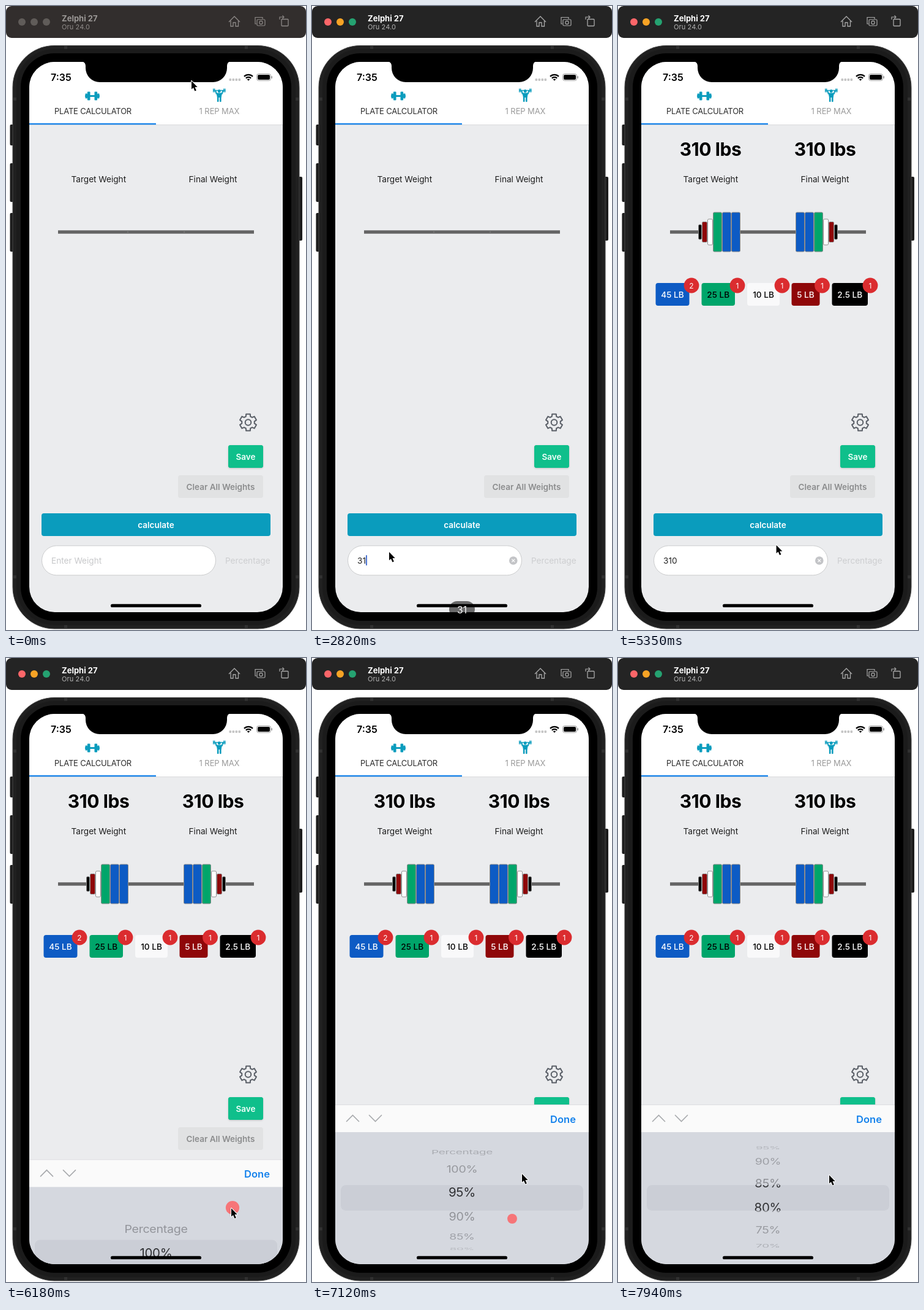
An HTML page with a canvas for the animation above (8 s loop, 490x1016 px).

```html
<!DOCTYPE html>
<html lang="en">
<head>
<meta charset="utf-8">
<title>Plate calculator</title>
<style>
html, body { margin: 0; width: 100%; height: 100%; overflow: hidden; background: #fff; }
canvas { display: block; width: 490px; height: 1016px; }
</style>
</head>
<body>
<canvas id="stage"></canvas>
<script>
const W = 490, H = 1016, LOOP = 8000;
const canvas = document.getElementById('stage');
const c = canvas.getContext('2d');
const dpr = window.devicePixelRatio || 1;
canvas.width = W * dpr;
canvas.height = H * dpr;

const TEAL = '#0a9cbd', BLUE = '#0d5bc4', GREEN = '#00a56a', RED = '#8f0709';
const clamp = v => Math.max(0, Math.min(1, v));
const ramp = (t, a, b) => clamp((t - a) / (b - a));
const smooth = u => u * u * (3 - 2 * u);

function box(x, y, w, h, r, fill, stroke, lw = 1) {
  c.beginPath();
  c.roundRect(x, y, w, h, r);
  if (fill) { c.fillStyle = fill; c.fill(); }
  if (stroke) { c.strokeStyle = stroke; c.lineWidth = lw; c.stroke(); }
}
function disc(x, y, r, fill) {
  c.beginPath();
  c.arc(x, y, r, 0, Math.PI * 2);
  c.fillStyle = fill;
  c.fill();
}
function line(pts, color, lw, close) {
  c.beginPath();
  pts.forEach(([x, y], i) => i ? c.lineTo(x, y) : c.moveTo(x, y));
  if (close) c.closePath();
  c.strokeStyle = color;
  c.lineWidth = lw;
  c.stroke();
}
// y is the middle of the capital letters
function text(s, x, y, size, color, { weight = 400, align = 'center', gap = 0 } = {}) {
  c.font = `${weight} ${size}px Inter, "Liberation Sans", sans-serif`;
  c.letterSpacing = gap + 'px';
  c.textAlign = align;
  c.fillStyle = color;
  c.fillText(s, x, y + size * 0.36);
}

// ---- timing ----
// start, end, x, y, sideways bow in y, easing
const easeOut = u => 1 - Math.pow(1 - u, 1.3);
const MOVES = [
  [100, 180, 296, 118, 0, smooth],
  [330, 1060, 126, 889, 0, smooth],
  [3800, 4260, 173, 851, 0, smooth],
  [5150, 5710, 368, 896, 7, easeOut],
  [6400, 6690, 327, 913, 0, smooth],
  [6780, 7110, 343, 840, 0, smooth],
  [7130, 7530, 349, 838, 0, smooth],
  [7560, 7940, 345, 842, 0, smooth]
];
function pointer(t) {
  let x = 303, y = 122;
  for (const [a, b, nx, ny, bow, ease] of MOVES) {
    const u = ease(ramp(t, a, b));
    x += (nx - x) * u;
    y += (ny - y) * u + bow * 4 * u * (1 - u);
  }
  return [x, y];
}
// press, release, x, y
const TAPS = [
  [1180, 1350, 127, 890],
  [4380, 4490, 173.5, 851.5],
  [5880, 6010, 370, 895],
  [6750, 6841, 327, 913]
];
const KEYS = [[3240, '310'], [2820, '31'], [2180, '3'], [0, '']];
const typed = t => KEYS.find(k => t >= k[0])[1];

function caretAlpha(t) {
  if (t < 1350 || t > 4490) return 0;
  return t < 2180 ? 1 - ramp(t, 1850, 2000) : 1;
}
function pickerDrop(t) {
  const s = (t - 6037) * 0.0156;
  return s <= 0 ? 260 : 260 * (1 + s) * Math.exp(-s);
}
const wheelPos = t => t < 6900 ? 1 : 1 + 4.805 * (1 - Math.exp((6900 - t) / 750));

// ---- window bar ----
function titleBar(on) {
  box(0, 0, W, 52, 9, on ? '#242424' : '#322e2d');
  const dots = on ? ['#fb6669', '#f6a325', '#25a271'] : ['#605c59', '#605c59', '#605c59'];
  dots.forEach((d, i) => disc(26 + 20 * i, 26, 6, d));
  text('Zelphi 27', 91, 20, 13, on ? '#fff' : '#9b9896', { weight: 700, align: 'left' });
  text('Oru 24.0', 91, 34.5, 11, on ? '#b4b4b4' : '#908c8a', { align: 'left', gap: 0.1 });
  const ink = on ? '#a9a9a9' : '#8d8987';
  line([[364, 26], [373, 17], [382, 26]], ink, 1.3);
  line([[367, 24], [367, 33], [371, 33], [371, 27], [375, 27], [375, 33], [379.5, 33], [379.5, 24]], ink, 1.3);
  line([[409, 29], [407, 29], [407, 18.5], [419, 18.5], [419, 21]], ink, 1.2);
  box(410, 22, 13, 10, 1.5, null, ink, 1.2);
  c.beginPath();
  c.arc(416.5, 27, 2.6, 0, 7);
  c.stroke();
  box(450, 21.5, 11, 11, 1, null, ink, 1.3);
  line([[447, 22], [447, 18], [454, 18]], ink, 1.2);
  line([[451.5, 15.5], [454, 18], [451.5, 20.5]], ink, 1.2);
}

// ---- phone body ----
function phone() {
  [[193, 34], [256, 63], [337, 63]].forEach(([y, h]) => box(6.5, y, 8, h, 2, '#1c1c1c'));
  box(476, 278, 8, 104, 2, '#1c1c1c');
  box(11, 64.5, 468, 949.5, 68, '#202020', '#444', 1);
  c.fillStyle = '#303030';
  for (const x of [95, 390]) { c.fillRect(x, 65, 5, 6); c.fillRect(x, 1008, 5, 6); }
  for (const y of [149, 927]) { c.fillRect(11.5, y, 6, 5); c.fillRect(473, y, 6, 5); }
  box(17, 70, 456, 938, 62, '#1b1b1b');
  box(24, 77, 442, 924, 55, '#000');
}

function notch() {
  c.fillStyle = '#000';
  c.beginPath();
  c.moveTo(123, 90);
  c.lineTo(367, 90);
  c.quadraticCurveTo(361, 91, 361, 98);
  c.arcTo(361, 124, 340, 124, 23);
  c.lineTo(153, 124);
  c.arcTo(130, 124, 130, 98, 23);
  c.lineTo(130, 98);
  c.quadraticCurveTo(130, 91, 123, 90);
  c.fill();
}

function statusBar() {
  text('7:35', 73, 116, 16, '#000', { weight: 600, align: 'left' });
  for (let i = 0; i < 4; i++) box(364.5 + i * 5, 118, 3.6, 4, 1.2, '#c6c6c6');
  c.strokeStyle = '#000';
  c.lineCap = 'butt';
  for (const [r, lw] of [[1.6, 3.2], [5.9, 2.2], [9.9, 2.3]]) {
    c.beginPath();
    c.arc(396, 121.8, r, -Math.PI * 0.75, -Math.PI * 0.25);
    c.lineWidth = lw;
    c.stroke();
  }
  box(409.5, 110.5, 23, 11, 3.2, null, '#999', 1);
  box(411, 112, 20, 8, 2, '#000');
  box(433.5, 114, 1.5, 4, 0.8, '#999');
}

function tabs() {
  c.fillStyle = '#fff';
  c.fillRect(38, 91, 414, 102);
  c.fillStyle = '#d9dadc';
  c.fillRect(38, 193, 414, 1);
  c.fillStyle = '#1d86ea';
  c.fillRect(38, 190.8, 207, 2.4);
  text('PLATE CALCULATOR', 142, 171, 13, '#2c2c2c', { gap: -0.2 });
  text('1 REP MAX', 348.5, 171, 13, '#9a9a9a', { gap: -0.1 });
  for (const s of [-1, 1]) {
    box(141 + s * 5.8 - 2.3, 139.5, 4.6, 14, 1, TEAL);
    box(141 + s * 9.8 - 1.7, 142.5, 3.4, 8, 1, TEAL);
  }
  c.fillRect(129, 145.4, 24, 2.4);
  c.fillRect(136, 145.2, 10, 2.8);
  // lifter
  c.fillRect(338, 136.8, 20.5, 1.3);
  for (const x of [338, 340, 355, 357]) c.fillRect(x, 134.5, 1.4, 6);
  disc(348.2, 138.6, 2.5, TEAL);
  c.lineCap = 'round';
  line([[342.5, 138], [343.5, 142.5], [353, 142.5], [354, 138]], TEAL, 2);
  c.beginPath();
  c.moveTo(343.5, 142); c.lineTo(353, 142); c.lineTo(351.5, 149); c.lineTo(345, 149);
  c.fill();
  for (const x of [346.2, 350.3]) line([[x, 148], [x, 155]], TEAL, 2.6);
}

function gear(x, y) {
  const pts = [];
  for (let i = 0; i < 6; i++) {
    const a = i * Math.PI / 3 - Math.PI / 2;
    for (const [d, r] of [[-0.36, 10.4], [-0.24, 14], [0.24, 14], [0.36, 10.4]])
      pts.push([x + r * Math.cos(a + d), y + r * Math.sin(a + d)]);
  }
  c.lineJoin = 'round';
  line(pts, '#5a5f67', 2, true);
  c.beginPath();
  c.arc(x, y, 4.8, 0, 7);
  c.stroke();
  c.lineJoin = 'miter';
}

// ---- results ----
const PLATES = [
  [131.5, 5, 24, '#000'], [137.5, 8, 33, RED], [146.5, 8, 42, '#fff'],
  [155.5, 14, 64, GREEN], [170.5, 14, 64, BLUE], [185.5, 14, 64, BLUE]
];
const CHIPS = [
  ['45 LB', 61.5, 55, BLUE, '#fff', 120, 2],
  ['25 LB', 136.5, 54.5, GREEN, '#000', 195, 1],
  ['10 LB', 211, 53, '#f9f9fa', '#000', 268, 1],
  ['5 LB', 283.5, 46, RED, '#fff', 333.5, 1],
  ['2.5 LB', 349.5, 58.5, '#000', '#fff', 412, 1]
];
function results() {
  for (const x of [151, 338])
    text('310 lbs', x, 233.5, 30, '#000', { weight: 700, gap: -0.4 });
  for (const [x, w, h, col] of PLATES) {
    box(x, 368 - h / 2, w, h, 1.8, col, '#8c8c8c');
    box(W - x - w, 368 - h / 2, w, h, 1.8, col, '#8c8c8c');
  }
  for (const [s, x, w, bg, ink, bx, n] of CHIPS) {
    box(x, 451, w, 37, 4, bg);
    text(s, x + w / 2, 470, 13.6, ink, { weight: 500 });
    disc(bx, 455, 12.4, '#db2c2f');
    text(String(n), bx, 455.3, 12, '#fff');
  }
}

function button(s, x, y, w, bg, ink) {
  box(x, y, w, 37, 4, bg);
  text(s, x + w / 2, y + 19, 13.5, ink, { weight: 600 });
}

function form(t) {
  text('Target Weight', 151.3, 282, 13.6, '#1c1c1c');
  text('Final Weight', 338, 282, 13.6, '#1c1c1c');
  c.fillStyle = '#646464';
  c.fillRect(85, 365.3, 320, 5.4);
  if (t >= 4490) results();
  else { disc(199, 368, 0.8, '#8e8e8e'); disc(291, 368, 0.8, '#8e8e8e'); }

  gear(395.5, 678);
  c.save();
  c.shadowColor = 'rgba(0,0,0,0.18)';
  c.shadowBlur = 3 * dpr;
  c.shadowOffsetY = dpr;
  box(363, 715, 57, 37, 4, '#0fbf8b');
  c.restore();
  button('Save', 363, 715, 57, '#0fbf8b', '#f1fffb');
  button('Clear All Weights', 281, 764, 139, '#e1e2e3', '#8b8c8d');
  button('calculate', 58, 826, 374, TEAL, '#fff');

  box(58.5, 878.8, 284, 48, 24, '#fff', '#cbcccd');
  const s = typed(t);
  text(s || 'Enter Weight', 74, 903, 13.6, s ? '#222' : '#c7c8ca', { align: 'left' });
  const end = 74 + (s ? c.measureText(s).width : 0);
  c.globalAlpha = caretAlpha(t);
  box(end, 894, 2, 17, 1, '#456fd0');
  c.globalAlpha = 1;
  text('Percentage', 358, 903, 13.6, '#cdced0', { align: 'left' });
  if (s) {
    c.globalAlpha = ramp(t, 2160, 2300);
    disc(328.8, 903, 6.8, '#c3c4c7');
    line([[326.4, 900.6], [331.2, 905.4]], '#fff', 1.3);
    line([[331.2, 900.6], [326.4, 905.4]], '#fff', 1.3);
    c.globalAlpha = 1;
  }
}

// ---- picker ----
const OPTIONS = ['Percentage'];
for (let p = 100; p >= 5; p -= 5) OPTIONS.push(p + '%');

// size and shade depend on how far an option is turned away
function wheel(pos, mid, size, shade) {
  OPTIONS.forEach((s, i) => {
    const deg = (i - pos) * 27;
    if (Math.abs(deg) > 86) return;
    const a = deg * Math.PI / 180, k = Math.cos(a);
    c.save();
    c.translate(245, mid + 86 * Math.sin(a));
    c.scale(size(k), size(k) * k);
    text(s, 0, 0, 20.5, shade(k), { gap: -0.3 });
    c.restore();
  });
}
function picker(t) {
  const drop = pickerDrop(t);
  if (drop >= 260) return;
  const top = 727 + drop, mid = top + 152;
  c.fillStyle = '#d5d8df';
  c.fillRect(38, top, 414, 262);
  c.fillStyle = '#fafafa';
  c.fillRect(38, top, 414, 45);
  c.fillStyle = '#dcdde0';
  c.fillRect(38, top, 414, 1);
  c.lineCap = 'round';
  line([[56.5, top + 27.5], [66.5, top + 17.5], [76.5, top + 27.5]], '#a9abae', 1.7);
  line([[93.5, top + 17.5], [103.5, top + 27.5], [113.5, top + 17.5]], '#a9abae', 1.7);
  text('Done', 410, top + 23.7, 16.5, '#1582ec', { weight: 600 });

  const pos = wheelPos(t), y = mid - 20.7;
  box(47, y, 396, 41.4, 8, '#cbced6');
  c.save();
  c.beginPath();
  c.rect(38, top + 45, 414, y - top - 45);
  c.rect(38, y + 41.4, 414, 200);
  c.clip();
  wheel(pos, mid, k => 0.885 + 0.08 * k, k => `rgba(40,40,44,${0.08 + 0.34 * k})`);
  c.restore();
  c.save();
  c.beginPath();
  c.rect(38, y, 414, 41.4);
  c.clip();
  wheel(pos, mid, () => 1, () => '#2f3033');
  c.restore();
}

// ---- overlays ----
function keyPill(t) {
  const s = typed(t);
  if (!s || t > 5240) return;
  const w = 22 + 10 * s.length;
  c.globalAlpha = ramp(t, 2160, 2360) * (1 - ramp(t, 5160, 5240));
  box(245 - w / 2, 969, w, 26, 13, 'rgba(0,0,0,0.55)');
  text(s, 245, 983, 15.5, '#fff');
  c.globalAlpha = 1;
}
function taps(t) {
  for (const [down, up, x, y] of TAPS) {
    const u = ramp(t, up, up + 450);
    const r = 13 * (1 - u * u) * (t < down ? 0 : ramp(t, down - 40, down + 50));
    if (r > 0.2) disc(x, y, r, 'rgba(252,100,102,0.86)');
  }
}
function arrow(t) {
  const [x, y] = pointer(t);
  c.save();
  c.translate(x, y);
  c.beginPath();
  c.moveTo(0, 0); c.lineTo(0, 13.6); c.lineTo(3, 10.9); c.lineTo(5.4, 16.4);
  c.lineTo(7.8, 15.4); c.lineTo(5.5, 10.1); c.lineTo(9.7, 10);
  c.closePath();
  c.lineJoin = 'round';
  c.strokeStyle = '#fff';
  c.lineWidth = 2;
  c.stroke();
  c.fillStyle = '#000';
  c.fill();
  c.restore();
}

function draw(t) {
  c.setTransform(dpr, 0, 0, dpr, 0, 0);
  c.fillStyle = '#fff';
  c.fillRect(0, 0, W, H);
  c.lineCap = 'butt';
  c.lineJoin = 'miter';
  titleBar(t >= 1180);
  phone();
  c.save();
  c.beginPath();
  c.roundRect(38, 91, 414, 896, 41.5);
  c.clip();
  c.fillStyle = '#ebecee';
  c.fillRect(38, 91, 414, 896);
  tabs();
  statusBar();
  form(t);
  picker(t);
  notch();
  c.restore();
  box(171, 973.8, 148, 5.2, 2.6, '#000');
  keyPill(t);
  taps(t);
  arrow(t);
}

const start = performance.now();
function tick() {
  draw((performance.now() - start) % LOOP);
  requestAnimationFrame(tick);
}
tick();
</script>
</body>
</html>
```
